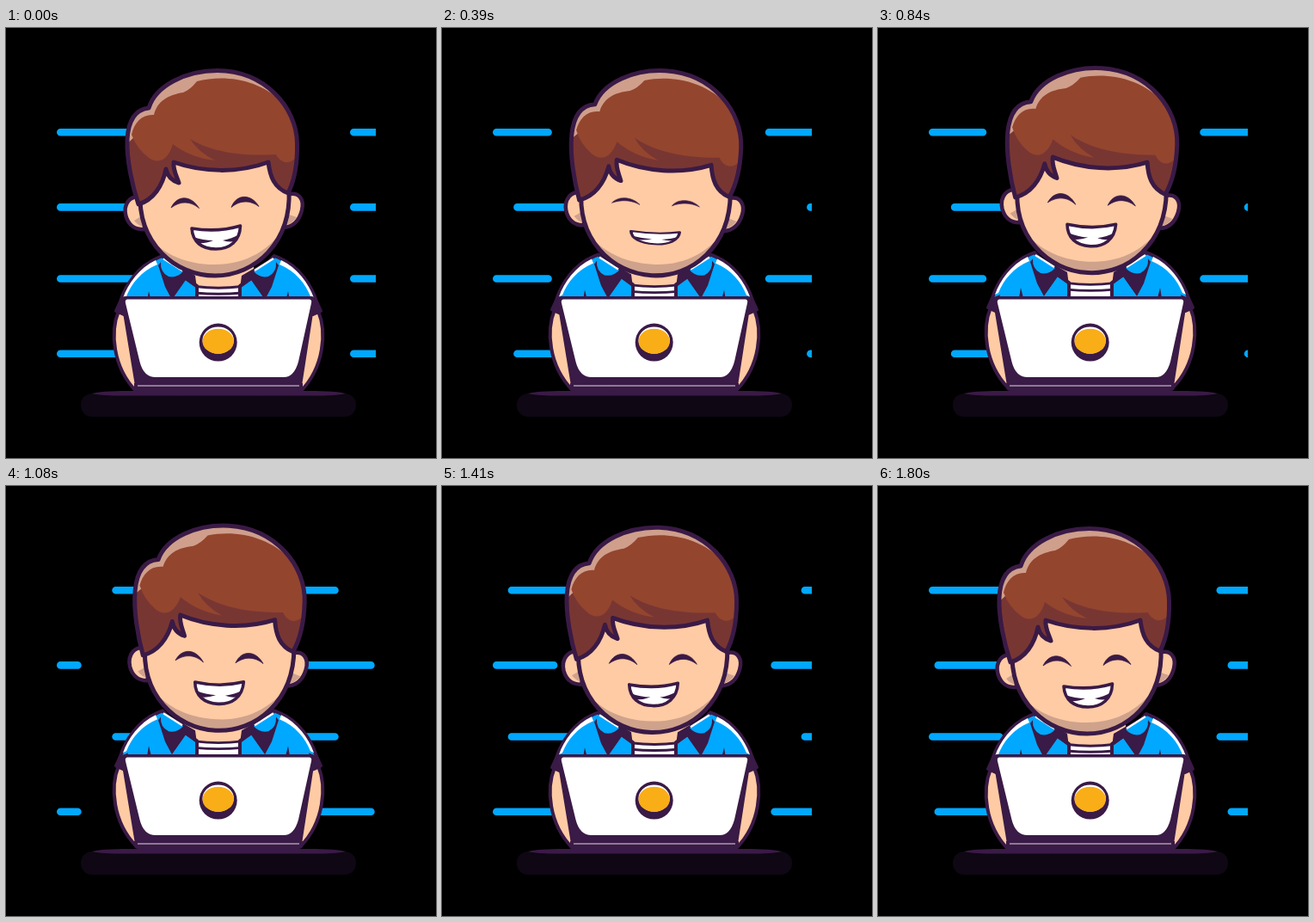
Write an HTML page with a canvas that moves like this. It is 500 by 500 pixels and loops after 1860 ms.

```html
<!DOCTYPE html>
<html lang="en">
<head>
<meta charset="utf-8">
<title>Working at a laptop</title>
<style>
html, body { margin: 0; width: 100%; height: 100%; overflow: hidden; background: #000; }
canvas { display: block; width: 100vw; height: 100vh; }
</style>
</head>
<body>
<canvas id="stage" width="500" height="500"></canvas>
<script>
const ctx = document.getElementById('stage').getContext('2d');
const LOOP = 1860, STEP = 30, LAST = 60;
const INK = '#3a1a46', SKIN = '#ffcba4', SHADE = '#cfa28c', BLUE = '#00a8ff',
      HAIR = '#94452e', HAIR_DARK = '#783633', HAIR_LIGHT = '#cf9f8c',
      WHITE = '#fff', GOLD = '#f9ae17';

const shape = (d, fill, line, width = 4.5) => {
  const p = new Path2D(d);
  if (fill) { ctx.fillStyle = fill; ctx.fill(p); }
  if (line) { ctx.strokeStyle = line; ctx.lineWidth = width; ctx.stroke(p); }
};

const clipped = (d, draw) => {
  ctx.save();
  ctx.clip(new Path2D(d));
  draw();
  ctx.restore();
};

const mirrored = (axis, draw) => {
  draw();
  ctx.save();
  ctx.translate(axis * 2, 0);
  ctx.scale(-1, 1);
  draw();
  ctx.restore();
};

// Smoothly eased value between [time, value] keys
function track(t, keys) {
  if (t <= keys[0][0]) return keys[0][1];
  for (let i = 1; i < keys.length; i++) {
    const [t0, a] = keys[i - 1], [t1, b] = keys[i];
    if (t < t1) {
      const u = (t - t0) / (t1 - t0);
      return a + (b - a) * u * u * (3 - 2 * u);
    }
  }
  return keys[keys.length - 1][1];
}

const TURN = [[0, 0], [400, 0.055], [950, 0.055], [1800, 0]];
const BOB = [[300, 0], [1000, -3.8], [1700, 0]];
const GRIN = [[150, 1], [420, 0.56], [500, 0.56], [850, 1]];

// Dashes sliding along four rows, odd rows to the left
function speedLines(k) {
  const thick = 8.6, dash = 93 - thick, period = 170.5, start = 63.3;
  ctx.save();
  ctx.beginPath();
  ctx.rect(50, 100, 380, 300);
  ctx.clip();
  ctx.lineCap = 'round';
  ctx.lineWidth = thick;
  ctx.strokeStyle = BLUE;
  ctx.setLineDash([dash, period - dash]);
  [121.3, 208.4, 291.5, 378.7].forEach((y, i) => {
    const shift = k * 11.258 * (i % 2 ? -1 : 1);
    ctx.lineDashOffset = ((-shift % period) + period) % period;
    ctx.beginPath();
    ctx.moveTo(start, y);
    ctx.lineTo(450, y);
    ctx.stroke();
  });
  ctx.restore();
}

function desk() {
  ctx.fillStyle = '#0f0714';
  ctx.beginPath();
  ctx.roundRect(87, 425, 320, 27, 13);
  ctx.fill();
  shape('M100 425C112 422 130 422 150 422H345C365 422 383 422 395 425C383 428 365 427.5 345 427.5H150C130 427.5 112 428 100 425Z', INK);
}

function body() {
  mirrored(247, () => {
    shape('M131 329C121 353 124 394 151 422H200V329Z', SKIN, INK, 4);
  });
  shape('M207 272H288V325H207Z', SKIN);
  shape('M214 289Q247 300 280 289L274 301Q247 304 220 301Z', SKIN);
  shape('M220 301Q247 304 274 301V325H220Z', WHITE);
  shape('M220 300.5Q247 304 274 300.5M220 308Q247 310.5 274 308', null, INK, 2.8);
  mirrored(247, () => {
    shape('M177 267C153 277 139 299 133 318L128 329L137 333L222 325V300L203 287L182 265Z', BLUE, INK, 4);
    shape('M174 270C155 279 142 297 136 314L140 312C146 297 157 283 176 275Z', WHITE);
    shape('M133 318L128 329L137 334L142 314Z', INK);
    shape('M177 276L185 301L193 316L209 293L222 303L220 288L184 267Z', INK);
    shape('M182 268L206 283Q199 291 189 289Q179 284 180 272Z', BLUE);
    shape('M183 268L205 282', null, WHITE, 2.4);
    shape('M193 316L209 294L220 303V318Z', BLUE);
    shape('M166 306L164 318H169Z', INK);
  });
}

const FACE = 'M156 190C153 250 196 288 243 288C290 288 332 249 329 188C327 120 157 120 156 190Z';
const CROWN = 'M154 205C147 184 140 153 141 130C142 109 149 95 166 93C174 67 209 49.5 246 49.5C301 50 338 92 338.5 134C339 157 335 178 328 192C312 186 307 173 305 156C270 169 229 168 195 156C194 165 198 171 201 180C194 178 188 173 186 164C182 184 171 200 154 205Z';

function ears() {
  shape('M159 197C143 193 136 206 139.5 219C143 230 151 235 161 234Z', SKIN, INK);
  shape('M149 224Q154 230 160 231L157 219Z', SHADE);
  shape('M327 194C341 189 347 200 344 212C341 224 334 231 323 232Z', SKIN, INK);
  shape('M338 220Q333 227 326 229L329 217Z', SHADE);
}

function squash(y, s, draw) {
  ctx.save();
  ctx.translate(0, y);
  ctx.scale(1, s);
  ctx.translate(0, -y);
  draw();
  ctx.restore();
}

function face(grin) {
  shape(FACE, SKIN);
  clipped(FACE, () => shape('M150 220C171 260 205 275 243 275C281 275 313 257 335 214V300H150Z', SHADE));
  shape(FACE, null, INK, 5);
  squash(202.5, grin, () => {
    shape('M192 209C199 194 215 194 224.5 209.5C214 201 203 201 192 209Z', INK, INK, 0.8);
    shape('M262 208.5C268 192.5 285 192.5 294 207.5C284 200 272 200 262 208.5Z', INK, INK, 0.8);
  });
  squash(244, grin, () => {
    shape('M216 233Q246 238 272.5 230C272 248 260 257 244 257C228 257 217 249 216 233Z', WHITE, INK, 3.6);
    shape('M218 243Q229 247 241 247Q231 251 223 250ZM271 240Q263 245 252 247Q262 250 268 247Z', INK);
  });
}

function hair() {
  shape(CROWN, HAIR_DARK);
  clipped(CROWN, () => {
    shape('M135 140V40H345V100L320 95L250 70L190 100L150 126Z', HAIR_LIGHT);
    shape('M146 124C149 110 158 100 172 101C176 85 188 78 206 75Q214 72 222 62C252 54 293 58 322 87L345 105V135C338 159 322 162 314 147C262 150 232 140 214 129Q223 144 243 154Q215 151 194 135C188 155 176 159 165 150Q152 140 146 124Z', HAIR);
  });
  shape(CROWN, null, INK, 5);
}

function head(t) {
  ctx.save();
  ctx.translate(245, 305 + track(t, BOB));
  ctx.rotate(track(t, TURN));
  ctx.translate(-245, -305);
  ears();
  face(track(t, GRIN));
  hair();
  ctx.restore();
}

function disc(x, y, rx, ry, color) {
  ctx.fillStyle = color;
  ctx.beginPath();
  ctx.ellipse(x, y, rx, ry, 0, 0, Math.PI * 2);
  ctx.fill();
}

function laptop() {
  shape('M138 312H356Q360 313 359 319L344 416H150L134 319Q133 313 138 312Z', INK);
  shape('M141 315.5H353Q356 316 355 320L340 388Q335 406 323 406H174Q160 406 155.5 388L139 320Q138 316 141 315.5Z', WHITE);
  shape('M149 413H345V418Q345 422 340 422H154Q149 422 149 418Z', INK);
  shape('M153 416H341', null, '#a898ae', 1.4);
  disc(246.7, 365.6, 22, 22, INK);
  disc(246.7, 363, 18.2, 15.6, WHITE);
  disc(246.7, 364.3, 18.2, 14.6, GOLD);
}

function draw(now) {
  const k = Math.min(LAST, Math.floor((now % LOOP) / STEP));
  const t = k * STEP;
  ctx.fillStyle = '#000';
  ctx.fillRect(0, 0, 500, 500);
  ctx.lineJoin = 'round';
  speedLines(k);
  desk();
  ctx.save();
  ctx.translate(0, -4 * Math.sin(Math.PI * t / 1830) ** 2);
  body();
  ctx.restore();
  head(t);
  laptop();
}

const origin = performance.now();
function tick() {
  draw(performance.now() - origin);
  requestAnimationFrame(tick);
}
tick();
</script>
</body>
</html>
```
